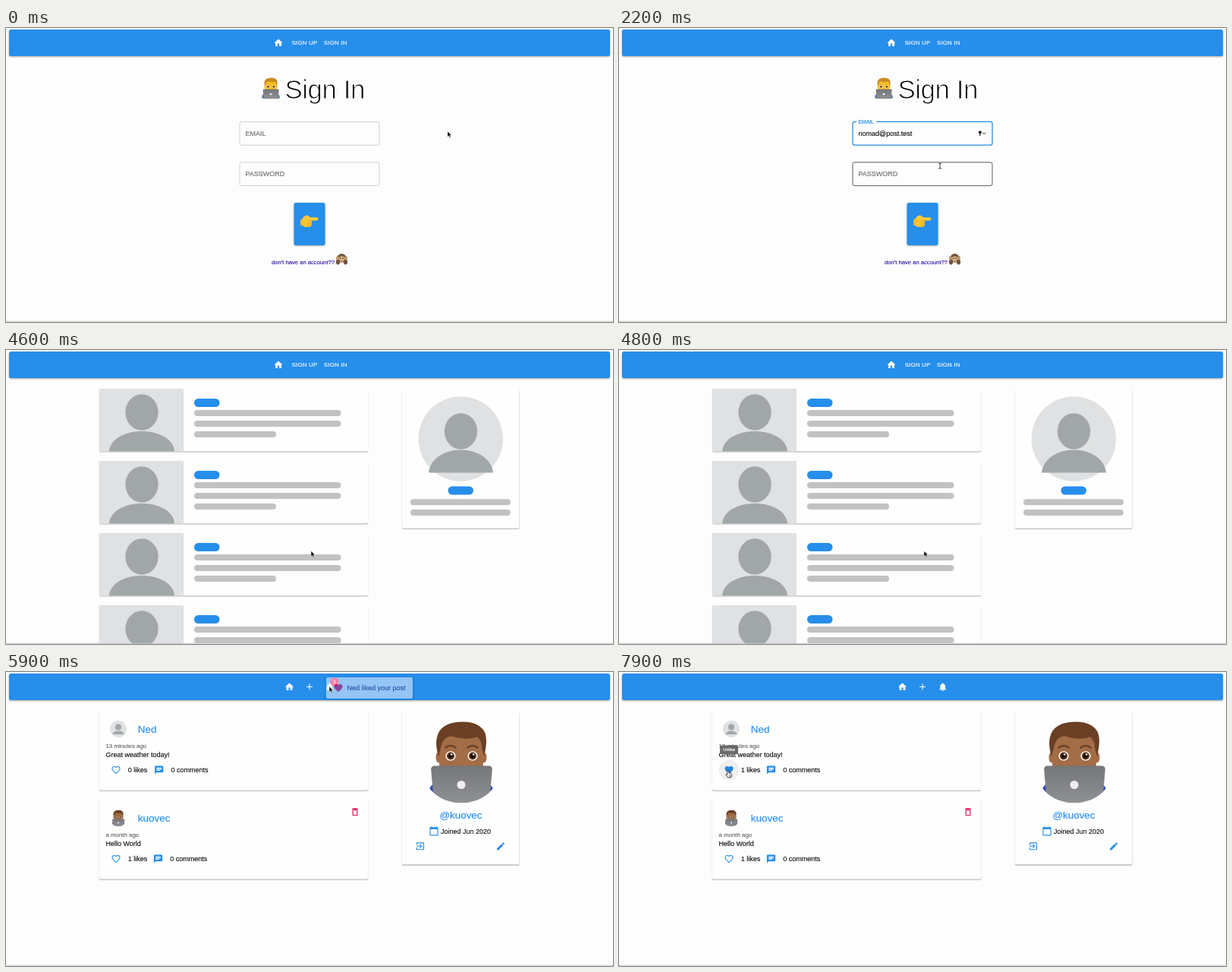
Animation of 800x387 px, one loop 8 s. Source, as an HTML page:

```html
<!DOCTYPE html>
<html lang="en">
<head>
<meta charset="utf-8">
<title>Sign in demo</title>
<style>
html, body { margin: 0; width: 100%; height: 100%; overflow: hidden; background: #fdfdfd; }
svg { display: block; width: 100vw; height: 100vh; font-family: "Liberation Sans", Arial, sans-serif; }
text { fill: currentColor; stroke: currentColor; stroke-width: .15; }
.light { stroke: #fdfdfd; stroke-width: 1.1; }
.bar, .button { filter: drop-shadow(0 1px 1.3px rgba(0, 0, 0, .35)); }
.menu { filter: drop-shadow(0 1.5px 2.5px rgba(0, 0, 0, .3)); }
</style>
</head>
<body>
<svg id="stage" viewBox="0 0 800 387">
  <defs>
    <clipPath id="round"><circle r="55"/></clipPath>
    <linearGradient id="lid" x2="0" y2="1"><stop stop-color="#747679"/><stop offset="1" stop-color="#8f9194"/></linearGradient>
  </defs>
  <g id="scene"></g>
</svg>
<script>
const BLUE = '#268eeb', PINK = '#e3004f', GREY = '#c2c2c2';
const USER = 'kuovec', FRIEND = 'Ned', EMAIL = 'nomad@post.test';
const LOOP = 8000, STEP = 100;

const ICONS = {
  home: 'M10 20v-6h4v6h5v-8h3L12 3 2 12h3v8z',
  add: 'M19 13h-6v6h-2v-6H5v-2h6V5h2v6h6v2z',
  bell: 'M12 22c1.1 0 2-.9 2-2h-4c0 1.1.89 2 2 2zm6-6v-5c0-3.07-1.64-5.64-4.5-6.32V4c0-.83-.67-1.5-1.5-1.5s-1.5.67-1.5 1.5v.68C7.63 5.36 6 7.92 6 11v5l-2 2v1h16v-1l-2-2z',
  heart: 'M12 21.35l-1.45-1.32C5.4 15.36 2 12.28 2 8.5 2 5.42 4.42 3 7.5 3c1.74 0 3.41.81 4.5 2.09C13.09 3.81 14.76 3 16.5 3 19.58 3 22 5.42 22 8.5c0 3.78-3.4 6.86-8.55 11.54z',
  chat: 'M20 2H4c-1.1 0-2 .9-2 2v18l4-4h14c1.1 0 2-.9 2-2V4c0-1.1-.9-2-2-2zM6 9h12v2H6zm8 5H6v-2h8zm4-6H6V6h12z',
  trash: 'M6 19c0 1.1.9 2 2 2h8c1.1 0 2-.9 2-2V7H6zM8 9h8v10H8zm7.5-5l-1-1h-5l-1 1H5v2h14V4z',
  calendar: 'M20 3h-1V1h-2v2H7V1H5v2H4c-1.1 0-2 .9-2 2v16c0 1.1.9 2 2 2h16c1.1 0 2-.9 2-2V5c0-1.1-.9-2-2-2zm0 18H4V8h16z',
  edit: 'M3 17.25V21h3.75L17.81 9.94l-3.75-3.75zM20.71 7.04c.39-.39.39-1.02 0-1.41l-2.34-2.34c-.39-.39-1.02-.39-1.41 0l-1.83 1.83 3.75 3.75z',
  exit: 'M10.09 15.59L11.5 17l5-5-5-5-1.41 1.41L12.67 11H3v2h9.67zM19 3H5c-1.11 0-2 .9-2 2v4h2V5h14v14H5v-4H3v4c0 1.1.89 2 2 2h14c1.1 0 2-.9 2-2V5c0-1.1-.9-2-2-2z'
};

const rect = (x, y, w, h, fill, r = 0, more = '') =>
  `<rect x="${x}" y="${y}" width="${w}" height="${h}" rx="${r}" fill="${fill}" ${more}/>`;
const oval = (x, y, rx, ry, fill, more = '') =>
  `<ellipse cx="${x}" cy="${y}" rx="${rx}" ry="${ry}" fill="${fill}" ${more}/>`;
const disc = (x, y, r, fill, more) => oval(x, y, r, r, fill, more);
const path = (d, fill, more = '') => `<path d="${d}" fill="${fill}" ${more}/>`;
const line = (d, color, width) => path(d, 'none', `stroke="${color}" stroke-width="${width}" stroke-linecap="round"`);
const text = (x, y, s, size = 9, color = '#111', more = '') =>
  `<text x="${x}" y="${y}" font-size="${size}" color="${color}" ${more}>${s}</text>`;
const at = (x, y, scale, body) => `<g transform="translate(${x} ${y}) scale(${scale})">${body}</g>`;
const icon = (name, x, y, fill = BLUE) => at(x, y, .56, path(ICONS[name], fill, 'transform="translate(-12 -12)"'));
const outlineHeart = (x, y) => at(x, y, .56,
  path(ICONS.heart, 'none', `transform="translate(-10.8 -10.8) scale(.9)" stroke="${BLUE}" stroke-width="2.2"`));
// Soft edge, dark bottom line, then the face of the card
const card = (x, y, w, h) => rect(x - .5, y, w + 1, h + 1.4, '#e6e6e6', 2.3)
  + rect(x, y + 4, w, h - 3.2, '#a8a8a8', 2) + rect(x, y, w, h, '#fefefe', 2);
const ramp = (t, a, b) => Math.max(0, Math.min(1, (t - a) / (b - a)));

// Person behind a laptop, about 90 units wide around the origin
function worker(skin, hair, shirt) {
  const eye = x => oval(x, -7, 6.6, 6.2, '#fff') + disc(x, -7, 5, '#5a2f14') + disc(x, -7, 2.8, '#150a05')
    + disc(x + 1.2, -9, 1.3, '#fff') + line(`M${x - 6.5} -18q6.5 -5 13 0`, hair, 2.6);
  return path('M-45 52Q-44 32 -34 28H34Q44 32 45 52z', shirt)
    + oval(-30, -5, 3.5, 7, skin) + oval(30, -5, 3.5, 7, skin)
    + path('M-29 -34Q0 -48 29 -34V4Q26 34 0 34T-29 4z', skin)
    + path('M-30 -6Q-37 -30 -27 -42Q-18 -52 2 -52Q22 -52 30 -40Q36 -30 30 -6L27 -18Q27 -27 21 -32Q4 -27 -12 -33Q-24 -33 -27 -18z', hair)
    + eye(-14) + eye(15)
    + path('M-35 6H36Q41 6 40.8 11L37 55H-36L-39.8 11Q-40 6 -35 6z', 'url(#lid)')
    + disc(0, 31, 5.5, '#eee');
}
const darkWorker = `<g clip-path="url(#round)">${worker('#a36d47', '#6b3f24', '#3348b5')}</g>`;

const pointing = rect(388, 251, 8, 9.5, '#f9b928', 3) + rect(391, 249, 12, 13, '#fcc52f', 4)
  + rect(396, 249.2, 15.5, 4.3, '#fdcb3a', 2.1) + line('M392 250.5Q396 246 399 249', '#fdcb3a', 2.4)
  + line('M398 254H404M398 257H403.5M398 260H402', '#d68f18', .7);

const monkey = disc(442.5, 303, 6, '#70543c') + oval(442.5, 305, 4.6, 4.4, '#d9b58d')
  + oval(437.5, 308, 2.6, 3.4, '#70543c') + oval(447.5, 308, 2.6, 3.4, '#70543c')
  + oval(437, 302.8, 1.9, 2.7, '#b98e68') + oval(448, 302.8, 1.9, 2.7, '#b98e68')
  + disc(440.9, 303.3, .8, '#2a1a10') + disc(444.1, 303.3, .8, '#2a1a10') + line('M440.8 307q1.7 1 3.4 0', '#5a3822', .7);

function nav(t) {
  const bar = rect(4, 2, 792, 35, BLUE, 2.5, 'class="bar"');
  if (t < 5000) {
    const spaced = 'letter-spacing=".2"';
    return bar + icon('home', 359, 19.5, '#fff')
      + text(376.7, 22.4, 'SIGN UP', 7.85, '#fff', spaced) + text(419, 22.4, 'SIGN IN', 7.85, '#fff', spaced);
  }
  const badge = t < 6000 ? disc(433, 13, 5.6, PINK) + text(433, 15.3, '1', 6.5, '#fff', 'text-anchor="middle"') : '';
  return bar + icon('home', 373.5, 19.5, '#fff') + icon('add', 400, 19.5, '#fff') + icon('bell', 426.7, 19.7, '#fff') + badge;
}

// Text field: up = label lift 0..1, notch = gap in the top edge
function field(y, label, notch, up, focus, hover, content) {
  const edge = focus ? BLUE : hover ? '#333' : '#c4c4c4';
  return rect(308, y, 184, 30.8, 'none', 2.4, `stroke="${edge}" stroke-width="${focus ? 1.3 : .8}"`)
    + (up > 0 ? rect(313, y - 1, notch * up, 2, '#fdfdfd') : '')
    + text(315.5, y + 18.3 - 16.1 * up, label, 9 - 2.25 * up, focus ? BLUE : '#6e6e6e')
    + content
    + (focus ? disc(475.8, y + 13.8, 1.9, '#111') + line(`M475.8 ${y + 14}v4`, '#111', 1.2)
      + line(`M479.3 ${y + 14.5}l1.8 1.8 1.8 -1.8`, '#111', 1) : '');
}

function signIn(t, pointer) {
  const typed = EMAIL.slice(0, Math.floor(15 * ramp(t, 675, 1800)));
  const dots = Math.floor(11 * ramp(t, 2700, 3600));
  const mask = Array.from({ length: dots }, (_, i) => disc(317 + 3.18 * i, 191.6, 1.1, '#111')).join('');
  const over = y => Math.abs(pointer.x - 400) < 92 && pointer.y > y && pointer.y < y + 31;
  return at(349, 79, .26, worker('#fdc32c', '#c98a22', '#3b62a8'))
    + text(367.5, 92.8, 'Sign In', 35, '#000', 'class="light" letter-spacing="-.5"')
    + field(123.4, 'EMAIL', 26, ramp(t, 500, 700), t >= 500 && t < 2400, over(123), text(315.5, 141.6, typed))
    + field(176.8, 'PASSWORD', 45, ramp(t, 2400, 2600), t >= 2400 && t < 4400, over(177), mask)
    + rect(379.5, 230, 41, 56, BLUE, 2.4, 'class="button"') + pointing
    + text(350, 310.5, "don't have an account??", 7.65, '#3512a4') + monkey;
}

function skeleton() {
  const grey = '#a1a7a9', pale = '#dfe1e2';
  const bar = (x, y, w) => rect(x, y, w, 8, GREY, 4);
  const post = i => at(0, 95 * i, 1, card(123, 51, 354, 82.5) + rect(123, 51, 111, 82.5, pale)
    + oval(179, 82, 21.7, 23.7, grey) + path('M136 133.5C137 117 157 107 179 107S221 117 222 133.5z', grey)
    + rect(248, 64, 33.5, 11, BLUE, 5.5) + bar(248, 79, 193.5) + bar(248, 93, 193.5) + bar(248, 107, 108));
  return [0, 1, 2, 3].map(post).join('') + card(522, 51, 154.5, 183.8)
    + disc(599.3, 117, 55.7, pale) + oval(599.5, 107, 21.7, 23.7, grey)
    + path('M557 161.5C559 143 578 131.5 599.5 131.5S640 143 642 161.5z', grey)
    + rect(582.5, 179.5, 33.5, 11, BLUE, 5.5) + bar(533, 196.3, 132) + bar(533, 210, 132);
}

function post(y, name, age, message, likes, liked) {
  const shift = likes ? -1.2 : 0;
  return at(0, y, 1, card(123, 51, 354, 104.8) + text(173.7, 79.6, name, 13.5, BLUE)
    + text(131.5, 100, age, 7.85, '#666') + text(131.5, 112.2, message)
    + (liked ? icon('heart', 145, 129) : outlineHeart(145, 129)) + text(160.7, 132, `${likes} likes`)
    + icon('chat', 201.7 + shift, 129) + text(217.5 + shift, 132, '0 comments'));
}

function feed(t) {
  const liked = t >= 7600, hover = t >= 7300;
  const tip = liked ? 'Unlike' : 'Like', tipWidth = liked ? 24 : 18;
  const menuAlpha = ramp(t, 5800, 6000) * (1 - ramp(t, 7100, 7300));
  return post(0, FRIEND, '13 minutes ago', 'Great weather today!', liked ? 1 : 0, liked)
    + disc(148, 75, 11, '#dfe1e2') + disc(148, 72.5, 4, '#a1a7a9') + path('M140.5 82Q142 77.5 148 77.5T155.5 82z', '#a1a7a9')
    + post(117, USER, 'a month ago', 'Hello World', 1, false)
    + at(148, 192.2, .2, darkWorker) + icon('trash', 460, 184.3, PINK)
    + card(522, 51, 154.5, 202.6) + (t >= 5300 ? at(600, 117.5, 1, darkWorker) : '')
    + text(599.5, 192.7, '@' + USER, 13.4, BLUE, 'text-anchor="middle"')
    + icon('calendar', 564, 209.3) + text(573, 212.6, 'Joined Jun 2020')
    + icon('exit', 546, 229.3) + icon('edit', 652, 229.5)
    + (hover ? disc(145, 129, 13.4, '#000', 'opacity=".06"') : '')
    + (t >= 7400 ? rect(145 - tipWidth / 2, 96.5, tipWidth, 11.8, '#616161', 2, 'opacity=".93"')
      + text(145, 104.4, tip, 5.6, '#fff', 'text-anchor="middle"') : '')
    + (menuAlpha ? `<g opacity="${menuAlpha}">` + rect(422, 7, 114, 28, '#fff', 2.3, 'class="menu"')
      + icon('heart', 438, 21, PINK) + text(449.5, 24, `${FRIEND} liked your post`, 9, '#2c1466') + '</g>' : '');
}

// time, x, y of the pointer tip
const TRACK = [
  [0, 582, 136], [100, 582, 136], [500, 436, 139], [1900, 436, 139], [2200, 423, 181.5], [2400, 420, 192],
  [3600, 418, 195], [4000, 413.5, 210], [4300, 402, 264.5], [5100, 402, 264.5], [5500, 420, 60],
  [5700, 426, 19], [6300, 426, 19], [6700, 202, 123.5], [7100, 143.8, 129.5], [LOOP, 143.8, 129.5]
];

function locate(t) {
  const i = TRACK.findIndex(k => k[0] > t);
  const [a, b] = [TRACK[i - 1], TRACK[i]];
  const k = ramp(t, a[0], b[0]), e = k * k * (3 - 2 * k);
  return { x: a[1] + (b[1] - a[1]) * e, y: a[2] + (b[2] - a[2]) * e };
}

function cursor(t, { x, y }) {
  if ((t >= 600 && t < 1900) || (t >= 2600 && t < 3700)) return '';
  const edge = (color, width) => `stroke="${color}" stroke-width="${width}" stroke-linejoin="round"`;
  const inField = t < 4600 && Math.abs(x - 400) < 92 && ((y > 123 && y < 154) || (y > 177 && y < 208));
  const onButton = t < 4600 && Math.abs(x - 400) < 20 && y > 230;
  const onBell = t >= 5600 && t < 5800;
  if (inField) return at(x, y, 1, line('M-1.7 -3.6Q0 -3.6 0 -2.5Q0 -3.6 1.7 -3.6M0 -2.5V2.5M-1.7 3.6Q0 3.6 0 2.5Q0 3.6 1.7 3.6', '#111', .8));
  if (onButton || onBell || t >= 7300) {
    return at(x, y, 1, path('M-1 1Q0 -.5 1 1V3.5L4 4.2Q5 4.5 4.8 6L4 9.3H-.3L-3 5.8Q-2.4 4.7 -1 5.8z', '#fff', edge('#111', .8))
      + line('M1.4 6V8M2.9 6V8', '#111', .5));
  }
  return at(x, y, 1, path('M0 0V7.4L1.7 5.8L2.9 8.6L4.2 8L3 5.3H5.2z', '#000', edge('#fff', .5)));
}

const scene = document.getElementById('scene');
let shown = -1;
function draw(now) {
  const t = Math.floor(now % LOOP / STEP) * STEP;
  if (t !== shown) {
    shown = t;
    const pointer = locate(t);
    const page = t < 4600 ? signIn(t, pointer) : t < 5000 ? skeleton() : feed(t);
    scene.innerHTML = nav(t) + page + rect(0, 385.7, 800, 1, '#c6c6c6') + cursor(t, pointer);
  }
  requestAnimationFrame(draw);
}
draw(performance.now());
</script>
</body>
</html>
```
